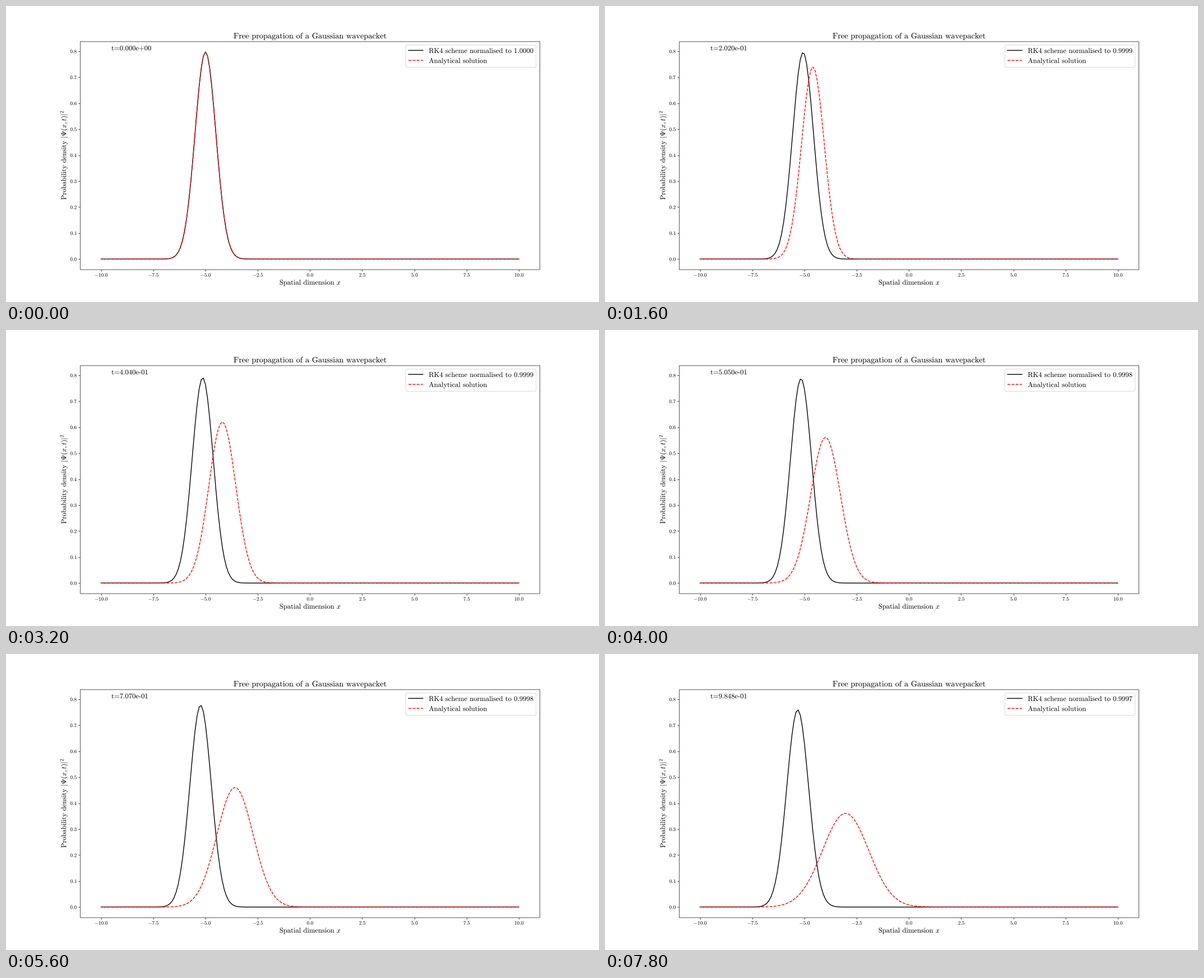
Animation, 1058 px wide and 529 px high, one loop 8000 ms. Source, as a matplotlib script:

```python
import matplotlib.pyplot as plt
import numpy as np
from matplotlib.animation import FuncAnimation
from matplotlib.patches import FancyBboxPatch, PathPatch, Rectangle
from matplotlib.textpath import TextPath
from matplotlib.transforms import Affine2D

plt.rcParams["mathtext.fontset"] = "cm"

W, H, DPI = 1058, 529, 66.125
FRAMES, INTERVAL = 40, 200
TITLE, BODY, TICK = 14.28, 12.58, 9.18  # letter sizes in pixels

X0, SIGMA, K0 = -5, 0.5, 2
DX, DT = 0.1, 1e-4
PEAK = 1 / (SIGMA * np.sqrt(2 * np.pi))

x = np.linspace(-10, 10, 201)
start_wave = np.fft.fft(
    np.sqrt(PEAK) * np.exp(-((x - X0) / (2 * SIGMA)) ** 2 + 1j * K0 * x))

# Growth per step: a sixth of the fourth Runge-Kutta slope, run backwards
omega = (1 - np.cos(2 * np.pi * np.fft.fftfreq(len(x)))) / DX**2
z = 1j * omega * DT
growth = 1 + (z + z**2 + z**3 / 2 + z**4 / 4) / 6


def numeric(step):
    return np.abs(np.fft.ifft(start_wave * growth**step)) ** 2


def exact(t):
    width = SIGMA * np.sqrt(1 + (t / (2 * SIGMA**2)) ** 2)
    u = (x - X0 - K0 * t) / width
    return np.exp(-u**2 / 2) / (width * np.sqrt(2 * np.pi))


fig = plt.figure(figsize=(W / DPI, H / DPI), dpi=DPI, facecolor="white")
ax = fig.add_axes([0.125, 0.11, 0.775, 0.77])
ax.set_xlim(-11, 11)
ax.set_ylim(-0.05 * PEAK, 1.05 * PEAK)
ax.spines[:].set_visible(False)
xticks = np.arange(-10, 10.1, 2.5)
yticks = np.arange(0, 0.85, 0.1)
ax.set_xticks(xticks, [""] * len(xticks))
ax.set_yticks(yticks, [""] * len(yticks))

# Transparent layer in pixel coordinates for frame, lettering and legend
page = fig.add_axes([0, 0, 1, 1])
page.set_xlim(0, W)
page.set_ylim(H, 0)
page.axis("off")


def tex(text, math=""):
    return rf"$\text{{{text}}}{math}$"


def glyphs(text, size):
    return TextPath((0, 0), text, size=size)


def label(px, py, text, size, align=0.5, angle=0):
    """Outlined text on a baseline; align 0 is left, 0.5 centre, 1 right."""
    path = glyphs(text, size)
    shift = -align * path.get_extents().x1
    place = Affine2D().translate(shift, 0).rotate_deg(angle)
    place = place.scale(1, -1).translate(px, py)
    patch = PathPatch(path, fc="k", lw=0, snap=False,
                      transform=place + page.transData)
    return page.add_artist(patch)


def to_page(vx, vy):
    px, py = ax.transData.transform((vx, vy))
    return px, H - py


for v in xticks:
    sign = "-" if v < 0 else ""
    label(to_page(v, 0)[0], 483.6, rf"${sign}\mathrm{{{abs(v):.1f}}}$", TICK)
for v in yticks:
    label(125.8, to_page(0, v)[1] + 3.2, rf"$\mathrm{{{v:.1f}}}$", TICK, 1)

label(542.2, 58, tex("Free propagation of a Gaussian wavepacket"), TITLE)
label(542.2, 498, tex("Spatial dimension ", "x"), BODY)
label(107.2, 267.2, tex("Probability density ", r"|\Psi(x,t)|^2"), BODY,
      angle=90)
clock = label(188.1, 79.3, tex("t=0"), BODY, 0)

page.add_patch(Rectangle((132.58, 63.81), 819.95, 407.33, fill=False,
                         lw=0.72, snap=False))
page.add_patch(FancyBboxPatch(
    (713.2, 69.9), 232.6, 39.6, boxstyle="round,pad=0,rounding_size=2.57",
    fc="white", ec="0.8", lw=1, alpha=0.8))
solid = dict(color="k", ls="-", lw=1.5, snap=False)
dashed = dict(color="r", ls="--", lw=1.5, snap=False)
page.plot([718.1, 743.9], [79.35, 79.35], **solid)
page.plot([718.1, 743.9], [97.2, 97.2], **dashed)
norm_label = label(754.3, 84, tex("RK4"), BODY, 0)
label(754.3, 101.8, tex("Analytical solution"), BODY, 0)

numeric_line, = ax.plot(x, numeric(0), **solid)
exact_line, = ax.plot(x, exact(0), **dashed)


def update(i):
    step = i * 25000 // 99
    t = step * DT
    density = numeric(step)
    norm = density.sum() * DX
    numeric_line.set_ydata(density)
    exact_line.set_ydata(exact(t))
    clock.set_path(glyphs(tex(f"t={t:.3e}"), BODY))
    norm_label.set_path(
        glyphs(tex(f"RK4 scheme normalised to {norm:.4f}"), BODY))
    return numeric_line, exact_line, clock, norm_label


anim = FuncAnimation(fig, update, frames=FRAMES, interval=INTERVAL,
                     init_func=lambda: update(0), repeat=True, blit=False)
plt.show()
```
